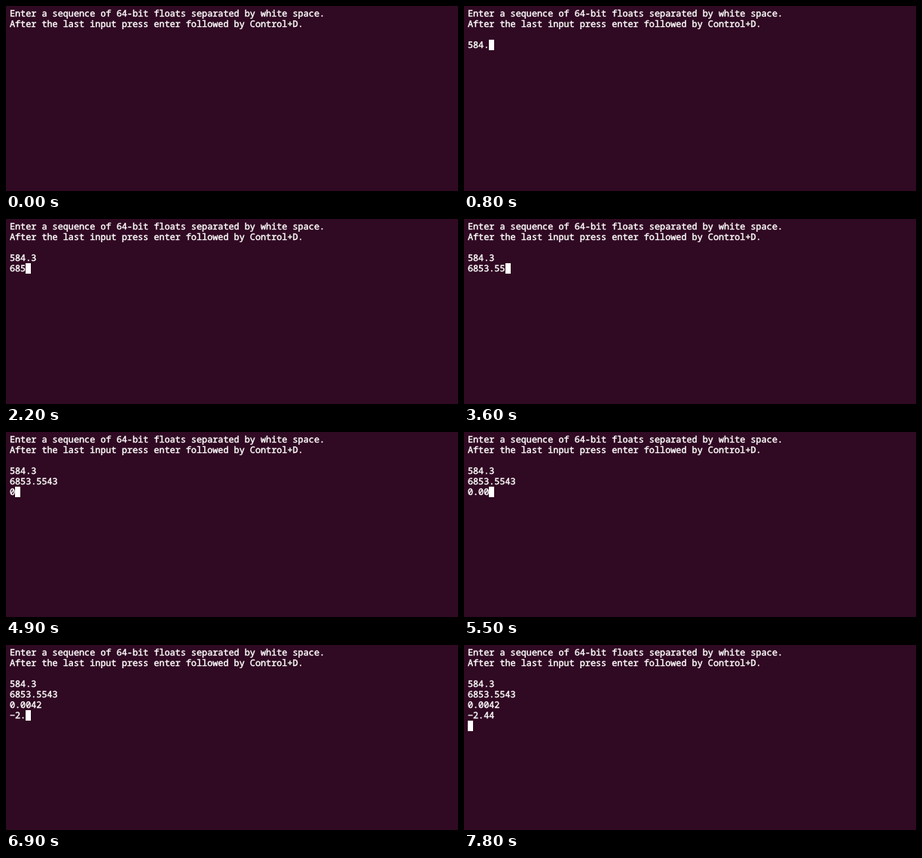
Recreate the animation shown at these times as an HTML page. Size 600 px wide and 247 px high, loop 8 s.

```html
<!DOCTYPE html>
<html lang="en">
<head>
<meta charset="utf-8">
<title>Terminal input</title>
<style>
  html, body { margin: 0; width: 100%; height: 100%; overflow: hidden; background: #300922; }
  svg { display: block; }
  text {
    font: 500 11.82px "Noto Sans Mono", "DejaVu Sans Mono", monospace;
    font-variant-ligatures: none;
    text-rendering: geometricPrecision;
    fill: #fff;
    stroke: #fff;
    stroke-width: 0.45px;
  }
  rect { fill: #fff; }
</style>
</head>
<body>
<svg id="screen" width="600" height="247" viewBox="0 0 600 247"></svg>
<script>
const LOOP = 8000;
const CELL = 7.09, ROW = 14.14, LEFT = 4.9, TOP = 2.4, ASCENT = 11.1;
const FIRST_ROW = 3;
const PROMPT = [
  "Enter a sequence of 64-bit floats separated by white space.",
  "After the last input press enter followed by Control+D."
];
// Typed characters and the moment each one appears, in ms.
const TYPED = "584.3\n6853.5543\n0.0042\n−2.44\n";
const TIMES = [
  300, 400, 600, 800, 900, 1100,
  1600, 1900, 2200, 2800, 3100, 3400, 3600, 3900, 4400, 4600,
  4900, 5000, 5300, 5500, 5600, 5700, 6000,
  6500, 6700, 6800, 7000, 7200, 7400
];

const screen = document.getElementById("screen");

function add(tag, attrs) {
  const el = document.createElementNS("http://www.w3.org/2000/svg", tag);
  for (const key in attrs) el.setAttribute(key, attrs[key]);
  return screen.appendChild(el);
}

const rowTop = row => TOP + row * ROW;
const addLine = row => add("text", { x: LEFT, y: rowTop(row) + ASCENT });

PROMPT.forEach((line, row) => { addLine(row).textContent = line; });
const cursor = add("rect", { width: 7, height: 14 });
const inputs = [0, 1, 2, 3].map(i => addLine(FIRST_ROW + i));

let shown = -1;

function render(time) {
  const count = TIMES.filter(t => t <= time).length;
  if (count === shown) return;
  shown = count;
  const lines = TYPED.slice(0, count).split("\n");
  inputs.forEach((el, i) => { el.textContent = lines[i] || ""; });
  const last = lines.length - 1;
  // The cursor sits on whole pixels.
  cursor.setAttribute("x", Math.round(LEFT + lines[last].length * CELL));
  cursor.setAttribute("y", Math.round(rowTop(FIRST_ROW + last)));
  cursor.setAttribute("visibility", count ? "visible" : "hidden");
}

const start = performance.now();

function tick() {
  render((performance.now() - start) % LOOP);
  requestAnimationFrame(tick);
}
tick();
</script>
</body>
</html>
```
